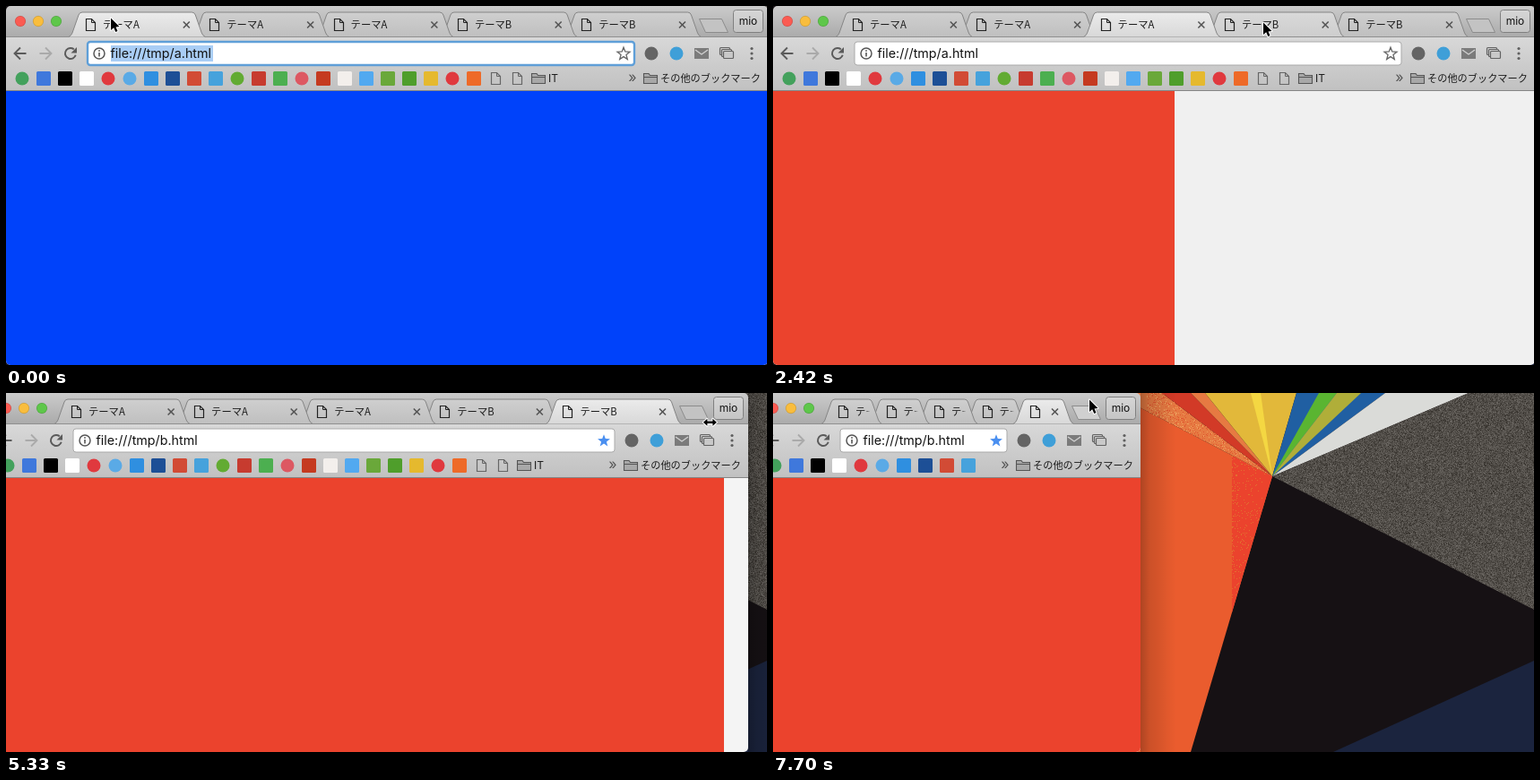
An HTML page with a canvas that plays this animation: 849x401 px, repeating every 7990 ms.

```html
<!DOCTYPE html>
<html lang="ja">
<head>
<meta charset="utf-8">
<title>Theme tabs</title>
<style>
html, body { margin: 0; width: 100%; height: 100%; overflow: hidden; background: #161114; }
canvas { display: block; }
</style>
</head>
<body>
<canvas id="stage" width="849" height="401"></canvas>
<script>
const W = 849, H = 401, LOOP = 7990;
const LATIN = 'Inter, "Open Sans", sans-serif';
const CJK = '"Noto Sans CJK JP", "Noto Sans CJK", sans-serif';
const BLUE = '#0042fa', RED = '#eb432d';
const TITLES = ['テーマA', 'テーマA', 'テーマA', 'テーマB', 'テーマB'];
const MARKS = ['#43a15c', '#3f78dc', '#000', '#fff', '#e0393e', '#5aaae6', '#2f8fe0', '#1d4f96',
  '#d24b35', '#46a2dc', '#62ab32', '#c73b2f', '#4caf50', '#dd5862', '#c53a20', '#f3efec',
  '#52a9f0', '#6aa83a', '#4f9e2b', '#e5b92e', '#e0393e', '#ee6a28'];
const ROUND = [0, 4, 5, 10, 13, 20];

const stage = document.getElementById('stage');
let ctx = stage.getContext('2d');

// Keyed values: [time, ...values]
const POINTER = [[0, 116, 12], [480, 116, 12], [620, 180, 15], [780, 269, 15], [930, 250, 15],
  [1330, 250, 15], [1570, 391, 16], [2020, 391, 16], [2250, 546, 17], [2550, 546, 17],
  [2850, 678, 15], [3150, 678, 15], [3570, 801, 7], [3780, 801, 7], [3950, 787, 6], [4040, 785, 6],
  [4230, 785, 6], [4600, 826, 15], [4740, 834, 30], [5250, 834, 30], [5490, 690, 38],
  [5650, 450, 41], [5730, 393, 42], [5820, 386, 43], [6020, 381, 44], [6180, 381, 44],
  [6830, 403, 45], [7060, 410, 45], [7220, 410, 45], [7700, 352, 6]];
const LEFT = [[0, 0], [3810, -4], [3880, -9], [3950, -14], [4040, -16]];
const RIGHT = [[5270, 828], [5340, 800], [5420, 770], [5490, 730], [5570, 660], [5650, 536],
  [5730, 464], [5820, 420], [5890, 395], [5950, 385], [6020, 381]];
const ACTIVE = [[0, 0], [1170, 1], [1860, 2], [2470, 3], [3000, 4]];

const held = (keys, t) => keys.filter(k => k[0] <= t).pop()[1];

function tween(keys, t) {
  const i = keys.findIndex(k => k[0] > t);
  if (i < 0) return keys[keys.length - 1].slice(1);
  const a = keys[i - 1], b = keys[i], f = (t - a[0]) / (b[0] - a[0]);
  return a.slice(1).map((v, n) => v + (b[n + 1] - v) * f);
}

function rightEdge(t, left) {
  if (t < 5270) return 850 + left;
  if (t < 6200) return held(RIGHT, t);
  if (t < 7000) return Math.min(405, Math.round(381 + (t - 6200) / 630 * 23));
  return t < 7060 ? 407 : 410;
}

function path(points, closed = true) {
  ctx.beginPath();
  points.forEach(([x, y]) => ctx.lineTo(x, y));
  if (closed) ctx.closePath();
}
function poly(color, ...points) { path(points); ctx.fillStyle = color; ctx.fill(); }
function line(color, width, ...points) {
  path(points, false);
  ctx.strokeStyle = color; ctx.lineWidth = width; ctx.stroke();
}
function rect(color, x, y, w, h) { ctx.fillStyle = color; ctx.fillRect(x, y, w, h); }
function disc(color, x, y, r) {
  ctx.beginPath(); ctx.arc(x, y, r, 0, 7); ctx.fillStyle = color; ctx.fill();
}
function ring(color, width, x, y, r, from = 0, to = 7) {
  ctx.beginPath(); ctx.arc(x, y, r, from, to);
  ctx.strokeStyle = color; ctx.lineWidth = width; ctx.stroke();
}
function box(x, y, w, h, r, fill, stroke, width = 1) {
  ctx.beginPath(); ctx.roundRect(x, y, w, h, r);
  if (fill) { ctx.fillStyle = fill; ctx.fill(); }
  if (stroke) { ctx.strokeStyle = stroke; ctx.lineWidth = width; ctx.stroke(); }
}
function shade(x0, y0, x1, y1, ...stops) {
  const g = ctx.createLinearGradient(x0, y0, x1, y1);
  stops.forEach((color, i) => g.addColorStop(i / (stops.length - 1), color));
  return g;
}
function label(text, x, y, size, font, color = '#1c1c1c', align = 'left') {
  ctx.font = `${size}px ${font}`;
  ctx.textAlign = align; ctx.fillStyle = color;
  ctx.fillText(text, x, y);
}

function paintWallpaper() {
  const canvas = document.createElement('canvas');
  canvas.width = W; canvas.height = H;
  const main = ctx, apex = [557, 93];
  ctx = canvas.getContext('2d');
  let seed = 7;
  const rnd = () => (seed = (seed * 16807) % 2147483647) / 2147483647;
  const ray = (color, a, b) => poly(color, apex, [a, 0], [b, 0]);

  rect('#161114', 0, 0, W, H);
  poly('#ea5c2e', apex, [466, 401], [330, 401], [330, -25]);
  poly(RED, apex, [512, 245], [512, 70]);
  for (let i = 0; i < 260; i++) {
    const x = 512 + rnd() * rnd() * 40, top = 93 - (557 - x) * .52;
    rect('#e2702f', x | 0, top + rnd() * (557 - x) * 3.8 | 0, 1, 1);
  }
  poly('#e67a42', apex, [330, -25], [330, -70], [434, 0]);
  for (let i = 0; i < 500; i++) {
    const f = Math.sqrt(rnd()), x = 557 - f * 140;
    rect(rnd() < .5 ? '#e0552f' : '#efa05e', x | 0, 93 - f * (73 + rnd() * 35) | 0, 1, 1);
  }
  ray('#d23a27', 434, 466);
  ray('#e67a42', 466, 482);
  ray('#e2b83a', 482, 584);
  ray('#f4d742', 533, 544);
  ray('#205fa2', 584, 683);
  ray('#5ab531', 609, 629);
  ray('#b0ae39', 629, 656);
  ray('#dadbd8', 683, 776);
  poly('#1b243e', [625, 401], [849, 299], [849, 401]);

  ctx.save();
  path([apex, [776, 0], [849, 0], [849, 242]]); ctx.clip();
  for (let y = 0; y < 243; y++) for (let x = 557; x < W; x++) {
    const v = 44 + (rnd() + rnd()) * 34 | 0;
    rect(`rgb(${v + 4},${v},${v - 5})`, x, y, 1, 1);
  }
  ctx.restore();
  ctx = main;
  return canvas;
}

function docIcon(x, y, color = '#222') {
  x = Math.round(x);
  path([[x - 4.5, y - 6.5], [x + 1.5, y - 6.5], [x + 5.5, y - 2.5], [x + 5.5, y + 6.5], [x - 4.5, y + 6.5]]);
  ctx.strokeStyle = color; ctx.lineWidth = 1.2; ctx.stroke();
  line(color, 1, [x + 1.5, y - 6], [x + 1.5, y - 2.5], [x + 5, y - 2.5]);
}
function folder(x, y) {
  path([[x - 7.5, y - 5.5], [x - 2, y - 5.5], [x - .5, y - 3.5], [x + 7.5, y - 3.5], [x + 7.5, y + 5.5], [x - 7.5, y + 5.5]]);
  ctx.fillStyle = '#a8a8a8'; ctx.fill();
  ctx.strokeStyle = '#555'; ctx.lineWidth = 1.1; ctx.stroke();
  line('#555', 1, [x - 7.5, y - 1.5], [x + 7.5, y - 1.5]);
}
function cross(x, y) {
  line('#555', 1.6, [x - 3.5, y - 3.5], [x + 3.5, y + 3.5]);
  line('#555', 1.6, [x + 3.5, y - 3.5], [x - 3.5, y + 3.5]);
}
function star(x, y, filled) {
  const points = Array.from({ length: 10 }, (_, i) => {
    const a = i * Math.PI / 5, r = i % 2 ? 3.1 : 7.3;
    return [x + r * Math.sin(a), y + .5 - r * Math.cos(a)];
  });
  if (filled) return poly('#4a8ff0', ...points);
  path(points); ctx.strokeStyle = '#666'; ctx.lineWidth = 1.3; ctx.stroke();
}
function arrow(x, dir, color) {
  line(color, 1.9, [x - 6.5 * dir, 53], [x + 6.5 * dir, 53]);
  line(color, 1.9, [x, 46.5], [x + 6.5 * dir, 53], [x, 59.5]);
}

function tab(i, left, pitch, active, pointer) {
  const x = left + 70 + i * pitch, end = x + pitch + 14, on = i === active;
  const hover = pointer[1] < 34 && pointer[0] > x + 7 && pointer[0] < end - 7;
  ctx.beginPath();
  ctx.moveTo(x, 34.5);
  ctx.quadraticCurveTo(x + 3, 33, x + 4, 30);
  ctx.lineTo(x + 11, 10);
  ctx.quadraticCurveTo(x + 12, 7, x + 15, 7);
  ctx.lineTo(end - 15, 7);
  ctx.quadraticCurveTo(end - 12, 7, end - 11, 10);
  ctx.lineTo(end - 4, 30);
  ctx.quadraticCurveTo(end - 3, 33, end, 34.5);
  ctx.fillStyle = on ? shade(0, 7, 0, 35, '#ebebeb', '#d8d8d8')
    : hover ? shade(0, 7, 0, 35, '#d9d9d9', '#cdcdcd') : shade(0, 7, 0, 35, '#cfcfcf', '#bfbfbf');
  ctx.fill();
  ctx.strokeStyle = '#858585'; ctx.lineWidth = 1; ctx.stroke();
  docIcon(x + 24, 21);
  const hasClose = on || pitch > 75, closeX = x + pitch - 7;
  const limit = hasClose ? closeX - 9 : x + pitch + 1;
  if (limit > x + 39) {
    ctx.save();
    ctx.beginPath(); ctx.rect(x + 36, 7, limit - x - 36, 27); ctx.clip();
    const ink = pitch > 75 ? '#1c1c1c' : shade(limit - 6, 0, limit, 0, '#1c1c1c', 'rgba(28,28,28,0)');
    label(TITLES[i], x + 38, 21, 11.3, CJK, ink);
    ctx.restore();
  }
  if (hasClose) cross(closeX, 21);
}

function titleBar(left, right, active, pointer) {
  rect(shade(0, 0, 0, 34, '#cbcbcb', '#ababab'), left, 0, right - left, 35);
  ['#fb5b52', '#f9bd3d', '#5ec74a'].forEach((c, i) => {
    disc(c, left + 16 + 20 * i, 17, 6);
    ring('rgba(0,0,0,.16)', .8, left + 16 + 20 * i, 17, 5.7);
  });
  const pitch = (right - left - 158.5) / 5, plus = left + 82 + 5 * pitch;
  const hover = pointer[1] < 30 && pointer[0] > plus && pointer[0] < plus + 30;
  path([[plus, 14.5], [plus + 25, 14.5], [plus + 32, 29.5], [plus + 7, 29.5]]);
  ctx.fillStyle = hover ? '#d0d0d0' : '#c3c3c3'; ctx.fill();
  ctx.strokeStyle = '#8c8c8c'; ctx.lineWidth = 1; ctx.stroke();
  for (let i = 4; i >= 0; i--) if (i !== active) tab(i, left, pitch, active, pointer);
  rect('#8f8f8f', left, 34, right - left, 1);
  tab(active, left, pitch, active, pointer);
  box(right - 38.5, 4.5, 33, 25, 3, shade(0, 4, 0, 30, '#d6d6d6', '#c4c4c4'), '#808080');
  label('mio', right - 22, 17.5, 12, LATIN, '#111', 'center');
}

function toolbar(left, right, t, active) {
  rect(shade(0, 35, 0, 94, '#d8d8d8', '#c1c1c1'), left, 35, right - left, 60);
  arrow(left + 16, -1, '#5a5a5a');
  arrow(left + 44, 1, '#aaa');
  ring('#5a5a5a', 1.9, left + 72, 53, 6, .3, 5.4);
  poly('#5a5a5a', [left + 79, 46], [left + 79, 52.5], [left + 72.5, 52.5]);

  const focus = t < 1170, end = right - 149, second = active > 2;
  box(left + 91, 40, end - left - 91, 26, 3, '#fff', focus ? '#5f9fd8' : '#aaa', focus ? 2.4 : 1);
  ring('#555', 1.5, left + 104, 53, 6);
  rect('#555', left + 103.2, 52, 1.6, 4.5);
  rect('#555', left + 103.2, 49.2, 1.6, 1.6);
  if (focus) rect('#a9cdf5', left + 117, 44, 114, 18);
  label(`file:///tmp/${second ? 'b' : 'a'}.html`, left + 116.5, 53.5, 14.3, LATIN, '#111');
  star(right - 161, 53, second);
  disc('#646464', right - 130, 53, 7.5);
  disc('#3f9fd8', right - 102, 53, 7.5);
  rect('#7b7b7b', right - 82, 47, 16, 12);
  line('#d0d0d0', 1.4, [right - 81, 49], [right - 74, 54], [right - 67, 49]);
  [[-53, 47], [-51, 49], [-49, 51]].forEach(([x, y]) =>
    box(right + x - .5, y - .5, 11, 8, 1, '#c9c9c9', '#636363', 1.2));
  [47.5, 53, 58.5].forEach(y => disc('#5f5f5f', right - 18, y, 1.6));
}

function bookmarks(left, right) {
  const fits = x => x + 8 <= right - 170;
  MARKS.forEach((color, i) => {
    const x = left + 18 + 24 * i;
    if (!fits(x)) return;
    if (ROUND.includes(i)) disc(color, x, 81, 7.5);
    else box(x - 8, 73, 16, 16, 1.5, color);
  });
  [546, 570].forEach(x => fits(left + x) && docIcon(left + x, 81, '#666'));
  if (fits(left + 610)) {
    folder(left + 594, 81);
    label('IT', left + 605, 81.5, 12, LATIN);
  }
  label('»', right - 151, 80.5, 16, LATIN, '#555', 'center');
  folder(right - 131, 81);
  label('その他のブックマーク', right - 120, 81, 11.2, CJK);
  rect('#858585', left, 94, right - left, 1);
}

function drawPointer(x, y, resizing) {
  if (resizing) {
    const side = s => [[x + 2 * s, y - 1.2], [x + 3 * s, y - 1.2], [x + 3 * s, y - 4], [x + 7.5 * s, y],
      [x + 3 * s, y + 4], [x + 3 * s, y + 1.2], [x + 2 * s, y + 1.2]];
    path([...side(1), ...side(-1).reverse()]);
  } else {
    path([[1, 1.5], [1, 15], [4.2, 12.2], [6.3, 17], [8.5, 16], [6.5, 11.4], [10.5, 11]].map(([a, b]) => [x + a, y + b]));
  }
  ctx.lineJoin = 'round';
  ctx.strokeStyle = '#fff'; ctx.lineWidth = 2; ctx.stroke();
  ctx.fillStyle = '#000'; ctx.fill();
  ctx.lineJoin = 'miter';
}

const wallpaper = paintWallpaper();

function draw(t) {
  const left = held(LEFT, t), right = rightEdge(t, left);
  const active = held(ACTIVE, t), pointer = tween(POINTER, t);
  const resizing = t >= 4680 && t < 7230;
  ctx.textBaseline = 'middle';

  ctx.drawImage(wallpaper, 0, 0);
  // The red band of the backdrop moves while the window narrows.
  if (t < 5820) poly(RED, [490, 58], [513, 70], [513, 242], [490, 320]);
  if (t >= 6200 && t < 7000) poly(RED, [429, 27], [452, 39], [452, 401], [429, 401]);
  rect(shade(right, 0, right + 40, 0, 'rgba(0,0,0,.26)', 'rgba(0,0,0,.13)', 'rgba(0,0,0,.09)',
    'rgba(0,0,0,.04)', 'rgba(0,0,0,0)'), right, 0, 40, H);

  ctx.save();
  ctx.beginPath();
  ctx.roundRect(left, 0, right - left, H, 5);
  ctx.clip();
  const halfPainted = (t >= 1800 && t < 1860) || (t >= 2420 && t < 2470);
  let pageEnd = right;
  if (halfPainted) pageEnd = 448;
  else if (t >= 5270 && t < 6020) pageEnd = Math.round(right - .63 * Math.max(0, right - pointer[0]));
  rect(halfPainted ? '#f0f0f0' : '#f4f4f4', left, 95, right - left, 306);
  rect(t < 2420 ? BLUE : RED, left, 95, pageEnd - left, 306);
  titleBar(left, right, active, pointer);
  toolbar(left, right, t, active);
  bookmarks(left, right);
  ctx.restore();

  drawPointer(pointer[0], pointer[1], resizing);
}

function frame(now) {
  draw(now % LOOP);
  requestAnimationFrame(frame);
}
draw(0);
requestAnimationFrame(frame);
</script>
</body>
</html>
```
